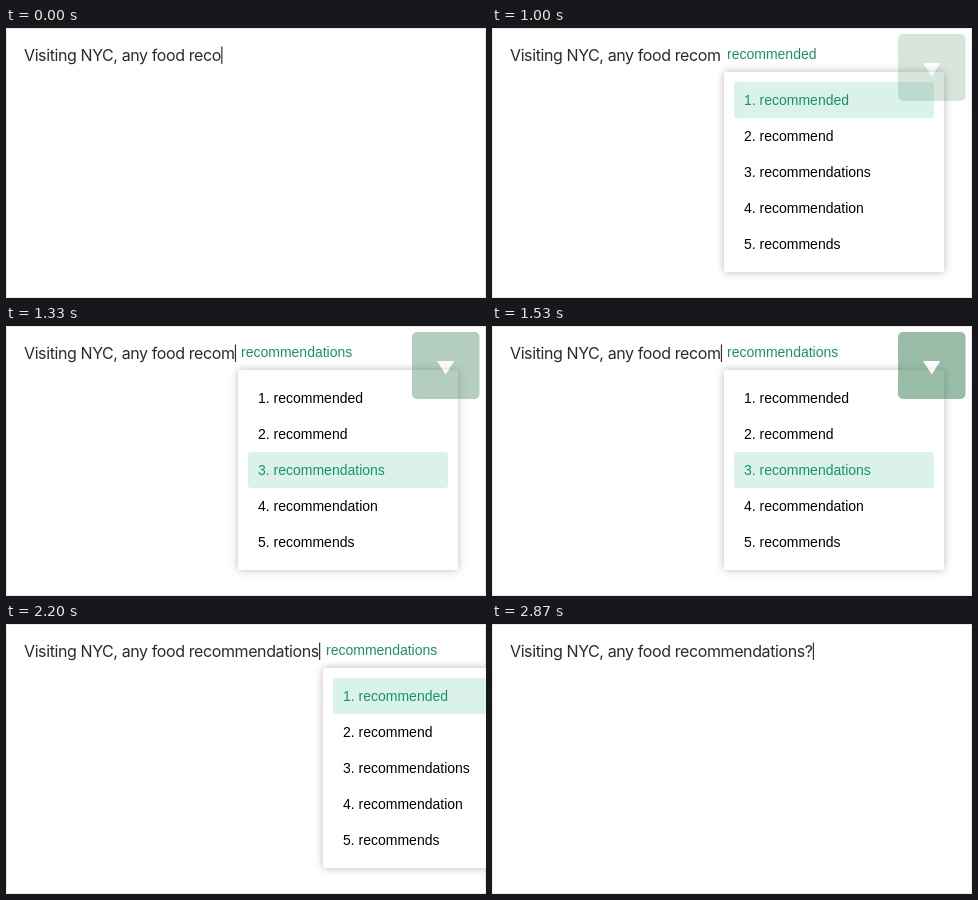
Recreate the animation shown at these times as an HTML page. Size 480 by 270 pixels, loop 2.94 s.

```html
<!DOCTYPE html>
<html lang="en">
<head>
<meta charset="utf-8">
<style>
  html, body { margin: 0; width: 100%; height: 100%; overflow: hidden; background: #fff; }
  svg { display: block; width: 100vw; height: 100vh; }
  #typed { font: 16px Inter, sans-serif; letter-spacing: -.4px; fill: #2b2b2b; }
  #hint, #list text { font: 14px "Liberation Sans", Arial, sans-serif; }
  #hint { fill: #16936a; }
  #panel { filter: drop-shadow(0 0 4px rgba(0, 0, 0, .27)); }
  #shift { font: bold 18.5px Roboto, sans-serif; fill: #fff; text-anchor: middle; }
</style>
</head>
<body>
<svg viewBox="0 0 480 270">
  <rect x=".5" y=".5" width="479" height="269" fill="#fff" stroke="#e9e9e9"/>
  <text id="typed" x="18" y="33"></text>
  <rect id="caret" y="18.5" width="1.2" height="17.5" fill="#333"/>
  <g id="popup">
    <text id="hint" x="235" y="31"></text>
    <rect id="panel" x="232" y="44" width="220" rx="2" fill="#fff"/>
    <rect id="mark" x="242" width="200" height="36" rx="3" fill="#daf2ea"/>
    <g id="list"></g>
  </g>
  <g id="key">
    <rect id="cap" x="406" y="6" width="67.5" height="67" rx="5"/>
    <path id="arrow" d="M431 35H448.4L439.7 48.5Z" fill="#fff"/>
    <text id="shift" x="440" y="46">shift</text>
  </g>
</svg>
<script>
const LOOP = 2940, ROW = 36, BLINK = 530;
const TYPE = 70, OPEN = 130, FILL = 270, SHIFT = 1870, ACCEPT = 2130, ASK = 2670, CLOSE = 2800;
const PRESSES = [976, 1282], HOLD = 315, FADE = 120;

const $ = id => document.getElementById(id);
const set = (node, attrs) => {
  for (const name in attrs) node.setAttribute(name, attrs[name]);
};
const show = (node, on) => set(node, { display: on ? 'inline' : 'none' });
const clamp = v => Math.max(0, Math.min(1, v));

const words = ['recommended', 'recommend', 'recommendations', 'recommendation', 'recommends'];
const rows = words.map((word, i) => {
  const row = document.createElementNS('http://www.w3.org/2000/svg', 'text');
  set(row, { x: 252, y: 77 + i * ROW });
  row.textContent = `${i + 1}. ${word}`;
  return $('list').appendChild(row);
});

function drawInput(t, chosen) {
  const word = t < TYPE ? 'reco' : t < ACCEPT ? 'recom' : chosen + (t < ASK ? '' : '?');
  const lastEdit = [ASK, ACCEPT, TYPE, 0].find(time => t >= time);
  $('typed').textContent = 'Visiting NYC, any food ' + word;
  set($('caret'), { x: 18.3 + $('typed').getComputedTextLength() });
  show($('caret'), Math.floor((t - lastEdit) / BLINK) % 2 === 0);
}

function drawPopup(t, moves) {
  const count = t < FILL ? 2 : words.length;
  const pick = t < ACCEPT ? moves : 0;
  const dx = t < ACCEPT ? 0 : t < ASK ? 85 : 93;
  show($('popup'), t >= OPEN && t < CLOSE);
  set($('popup'), { transform: `translate(${dx})` });
  set($('panel'), { height: 20 + count * ROW });
  set($('mark'), { y: 54 + pick * ROW });
  $('hint').textContent = words[moves];
  rows.forEach((row, i) => {
    show(row, i < count);
    set(row, { fill: i === pick ? '#16936a' : '#000' });
  });
}

function drawKey(t) {
  const shift = t >= SHIFT;
  // The arrow key swells and fades on each press; shift appears at once.
  const alpha = shift
    ? clamp((ACCEPT + 60 - t) / FADE)
    : Math.max(...PRESSES.map(p => clamp(Math.min(t - p, p + HOLD - t) / FADE)));
  set($('key'), { opacity: alpha });
  set($('cap'), { fill: shift ? '#38a175' : '#468761' });
  show($('arrow'), !shift);
  show($('shift'), shift);
}

function draw(t) {
  const moves = PRESSES.filter(p => t >= p + 40).length;
  drawInput(t, words[moves]);
  drawPopup(t, moves);
  drawKey(t);
}

const begin = performance.now();
function tick() {
  draw((performance.now() - begin) % LOOP);
  requestAnimationFrame(tick);
}
tick();
</script>
</body>
</html>
```
